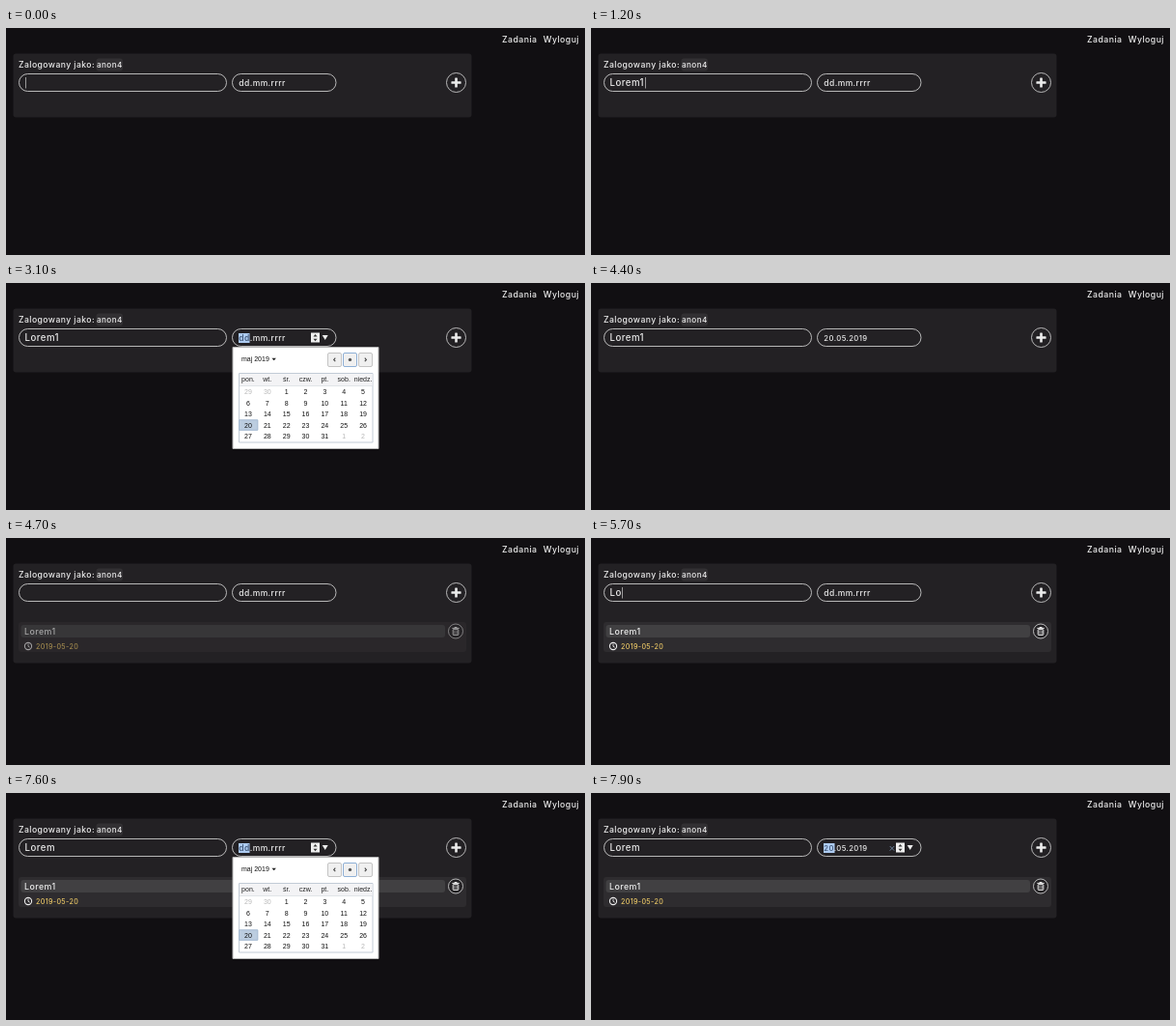
Animation of 600x235 px, one loop 8 s. Source, as an HTML page with a canvas:

```html
<!DOCTYPE html>
<html lang="pl">
<head>
<meta charset="utf-8">
<title>Zadania</title>
<style>
html, body { margin: 0; width: 100%; height: 100%; overflow: hidden; background: #110f12; }
canvas { display: block; width: 600px; height: 235px; }
</style>
</head>
<body>
<canvas id="stage"></canvas>
<script>
const LOOP = 8000, STEP = 100;
const INK = '#ececec', EDGE = '#d2d2d2', BACK = '#110f12', PANEL = '#232124';
const UI = 'Inter, sans-serif', SYS = '"Liberation Sans", Arial, sans-serif';
const canvas = document.getElementById('stage');
const ctx = canvas.getContext('2d');
const scale = window.devicePixelRatio || 1;
canvas.width = 600 * scale;
canvas.height = 235 * scale;

// [time, content of the task field]
const typing = [
  [0, ''], [500, 'L'], [600, 'Lo'], [700, 'Lor'], [800, 'Lore'], [900, 'Lorem'], [1200, 'Lorem1'],
  [4500, ''], [5600, 'L'], [5700, 'Lo'], [5800, 'Lor'], [6000, 'Lore'], [6500, 'Lorem']
];

const within = (t, a, b) => t >= a && t < b;
const ramp = (t, a, b) => Math.max(0, Math.min(1, (t - a) / (b - a)));

function text(str, x, y, size, color = INK, family = UI, align = 'left') {
  const wide = family === UI;
  ctx.font = `${wide ? 500 : 400} ${size}px ${family}`;
  ctx.letterSpacing = (wide ? size * 0.05 : 0) + 'px';
  ctx.fillStyle = color;
  ctx.textAlign = align;
  ctx.fillText(str, x, y);
  return ctx.measureText(str).width;
}

function rect(x, y, w, h, color) {
  ctx.fillStyle = color;
  ctx.fillRect(x, y, w, h);
}

function box(x, y, w, h, r, fill, stroke, width = 1) {
  ctx.beginPath();
  ctx.roundRect(x, y, w, h, r);
  ctx.fillStyle = fill;
  ctx.fill();
  if (stroke) {
    ctx.strokeStyle = stroke;
    ctx.lineWidth = width;
    ctx.stroke();
  }
}

// Outlined pill used by fields and round buttons
const pill = (x, y, w, h) => box(x, y, w, h, h / 2, PANEL, EDGE, 0.85);

function line(points, color, width) {
  ctx.beginPath();
  points.forEach(([x, y]) => ctx.lineTo(x, y));
  ctx.strokeStyle = color;
  ctx.lineWidth = width;
  ctx.stroke();
}

// Triangle centred at x, y; a negative h points up
function triangle(x, y, w, h, color) {
  ctx.beginPath();
  ctx.moveTo(x - w / 2, y - h / 2);
  ctx.lineTo(x + w / 2, y - h / 2);
  ctx.lineTo(x, y + h / 2);
  ctx.fillStyle = color;
  ctx.fill();
}

function drawFrame(hasItem) {
  rect(0, 0, 600, 235, BACK);
  text('Zadania', 514, 14.8, 8.75);
  text('Wyloguj', 556.7, 14.8, 8.75);
  box(7.5, 26.5, 475, hasItem ? 103 : 66, 3, PANEL);
  text('Zalogowany jako:', 13, 41, 8.65);
  box(93.5, 31.5, 27.5, 13, 3, '#323033');
  text('anon4', 107.4, 41, 8.2, INK, UI, 'center');
  pill(456.5, 46.5, 20, 20);
  box(461.4, 55.2, 10.2, 2.6, 0.6, INK);
  box(465.2, 51.4, 2.6, 10.2, 0.6, INK);
}

function drawTask(t) {
  const value = typing.filter(([at]) => at <= t).pop()[1];
  pill(13.5, 47.5, 215, 18);
  const w = text(value, 19.5, 60.2, 9.65);
  if (t < 1600 || within(t, 5500, 6700)) rect(Math.round(20 + w), 51, 0.6, 11.5, INK);
}

function drawDate(t) {
  const filled = within(t, 3300, 4500) || t >= 7900;
  const active = within(t, 1700, 3600) || t >= 6700;
  const focused = within(t, 2200, 3600) || t >= 6900;
  const hovered = within(t, 1800, 2500) || within(t, 6800, 7200);
  const [head, tail] = filled ? ['20', '.05.2019'] : ['dd', '.mm.rrrr'];
  const size = filled ? 7.7 : 8.5;
  pill(234.5, 47.5, 107.5, 18);
  if (focused) rect(241, 52, 11.5, 10, '#adcbf1');
  const w = text(head, 241.3, 59.7, size, focused ? '#3c5374' : INK);
  text(tail, 241.3 + w, 59.7, size);
  if (!active) return;
  if (filled) {
    line([[309.7, 55], [314.2, 59.7]], '#6f87a3', 0.9);
    line([[314.2, 55], [309.7, 59.7]], '#6f87a3', 0.9);
  }
  rect(316, 51.5, 9, 10, '#efefef');
  triangle(320.5, 54.3, 4, -2.4, '#333');
  triangle(320.5, 59, 4, 2.4, '#333');
  if (hovered) rect(325, 52, 11, 9, '#ededed');
  else triangle(330.7, 56.5, 6, 5, INK);
}

function drawItem(t) {
  if (t < 4500) return;
  ctx.save();
  ctx.globalAlpha = 1 - (1 - ramp(t, 4400, 5200)) ** 2;
  box(13, 87, 464, 31, 3, '#2e2c2f');
  box(15.5, 90, 439.5, 13, 3, '#414042');
  text('Lorem1', 19, 99.8, 8.85);
  text('2019-05-20', 31, 114.7, 7.1, '#e9c665');

  ctx.beginPath();
  ctx.arc(23, 112, 3.6, 0, Math.PI * 2);
  ctx.strokeStyle = INK;
  ctx.lineWidth = 1.1;
  ctx.stroke();
  line([[23, 109.6], [23, 112.2], [24.6, 113.2]], INK, 0.9);

  pill(458.5, 89, 15, 15);
  rect(462.3, 92.9, 7.4, 1, INK);
  rect(464.6, 92, 2.8, 1, INK);
  box(463.2, 94.6, 5.6, 5.8, 0.6, PANEL, INK);
  [464.6, 465.8, 467].forEach(x => rect(x, 95.6, 0.5, 4, INK));
  ctx.restore();
}

function drawCalendar(t) {
  const alpha = Math.max(
    ramp(t, 2300, 2600) * (1 - ramp(t, 3100, 3300)),
    ramp(t, 7000, 7300) * (1 - ramp(t, 7700, 7900))
  );
  if (!alpha) return;
  const left = 241, cell = 139 / 7, row = 11.5;
  ctx.save();
  ctx.globalAlpha = alpha;
  box(235, 66.5, 151, 105, 0, '#fff', '#b5b5b5');
  text('maj 2019', 244, 81.4, 7, '#111', SYS);
  triangle(277.7, 79, 4.4, 2.6, '#222');

  [333.5, 349.5, 365.5].forEach((x, i) =>
    box(x, 72.5, 14, 14, 1.5, '#f0f0f0', i === 1 ? '#8fb0d6' : '#c4c4c4'));
  triangle(356.5, 79.4, 0, 0, '#555');
  ctx.beginPath();
  ctx.arc(356.5, 79.4, 1.7, 0, Math.PI * 2);
  ctx.fill();
  line([[341.3, 77.7], [339.7, 79.4], [341.3, 81.1]], '#444', 1.1);
  line([[371.8, 77.7], [373.4, 79.4], [371.8, 81.1]], '#444', 1.1);

  box(241.5, 93.5, 138.5, 71.5, 0, '#fff', '#c2cbd6');
  rect(242, 94, 137.5, 12, '#f3f3f5');
  rect(242, 106, 137.5, 0.7, '#d5d9df');
  ['pon.', 'wt.', 'śr.', 'czw.', 'pt.', 'sob.', 'niedz.'].forEach((day, i) =>
    text(day, left + cell * (i + 0.5), 102.3, 7, '#222', SYS, 'center'));

  // 29 April is the first visible day
  for (let i = 0; i < 35; i++) {
    const n = i - 1;
    const x = left + cell * (i % 7 + 0.5);
    const y = 115.3 + row * Math.floor(i / 7);
    const inMonth = n >= 1 && n <= 31;
    if (n === 20) box(left + 0.5, y - 8, cell - 0.5, 10.5, 0, '#bccde0', '#a3b8d0');
    text(n < 1 ? n + 30 : inMonth ? n : n - 31, x, y, 7, inMonth ? '#111' : '#b8b8b8', SYS, 'center');
  }
  ctx.restore();
}

function draw(now) {
  const t = Math.floor((now % LOOP) / STEP) * STEP;
  ctx.setTransform(scale, 0, 0, scale, 0, 0);
  drawFrame(t >= 4500);
  drawTask(t);
  drawDate(t);
  drawItem(t);
  drawCalendar(t);
}

const start = performance.now();
function tick() {
  draw(performance.now() - start);
  requestAnimationFrame(tick);
}
tick();
</script>
</body>
</html>
```
